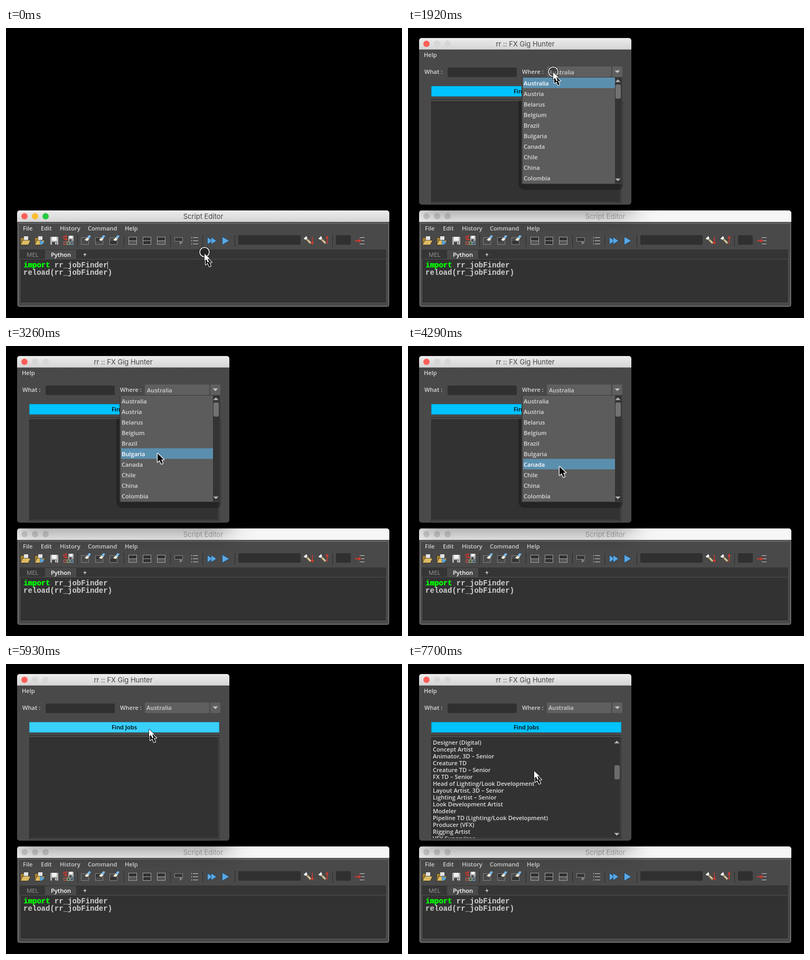
Animation, 750 px wide and 550 px high, one loop 8000 ms. Source, as an HTML page with a canvas:

```html
<!DOCTYPE html>
<html lang="en">
<head>
<meta charset="utf-8">
<title>Script editor demo</title>
<style>
html, body { margin: 0; height: 100%; overflow: hidden; background: #000; }
canvas { display: block; }
</style>
</head>
<body>
<canvas id="stage" width="750" height="550"></canvas>
<script>
const c = document.getElementById('stage').getContext('2d');
const LOOP = 8000, TICKS = 54;
const UI = '"Open Sans", "Noto Sans", sans-serif';
const LABEL = '600 11.1px ' + UI;
const TITLE = '13px Inter, sans-serif';
const MONO = 'bold 14px "Liberation Mono", monospace';

const countries = ['Australia', 'Austria', 'Belarus', 'Belgium', 'Brazil',
  'Bulgaria', 'Canada', 'Chile', 'China', 'Colombia'];
const jobs = ['3D Generalist', 'Animator', 'Art Director', 'Asset Artist', 'Compositor',
  'Compositor – Senior', 'CG Supervisor', 'Data Operator', 'Editor', 'Environment Artist',
  'FX Artist', 'Groom Artist', 'Lighting TD', 'Matte Painter', 'Motion Designer',
  'Previs Artist', 'Production Manager', 'Render Wrangler', 'Roto Artist', 'Texture Artist',
  'Designer (Digital)', 'Concept Artist', 'Animator, 3D – Senior', 'Creature TD',
  'Creature TD – Senior', 'FX TD – Senior', 'Head of Lighting/Look Development',
  'Layout Artist, 3D – Senior', 'Lighting Artist – Senior', 'Look Development Artist',
  'Modeler', 'Pipeline TD (Lighting/Look Development)', 'Producer (VFX)',
  'Rigging Artist', 'VFX Supervisor'];

// pointer path: tick, x, y
const path = [[0, 375, 427], [1, 375, 427], [3, 391, 403], [4, 391, 403], [5, 385, 385],
  [6, 278, 190], [7, 213, 88], [8, 238, 71], [9, 274, 83], [15, 274, 83],
  [17, 278, 106], [22, 286, 203], [26, 288, 259], [29, 286, 228], [30, 284, 195],
  [33, 275, 100], [38, 275, 100], [40, 270, 123], [44, 270, 123], [49, 238, 202], [54, 238, 202]];

function pointerAt(k) {
  const i = Math.max(1, path.findIndex(p => p[0] >= k));
  const [k0, x0, y0] = path[i - 1], [k1, x1, y1] = path[i];
  const u = (k - k0) / (k1 - k0);
  return [x0 + (x1 - x0) * u, y0 + (y1 - y0) * u];
}

function rect(x, y, w, h, fill, r = 0) {
  c.fillStyle = fill;
  c.beginPath();
  c.roundRect(x, y, w, h, r);
  c.fill();
}
function box(x, y, w, h, stroke) {
  c.strokeStyle = stroke;
  c.lineWidth = 1;
  c.strokeRect(x + .5, y + .5, w - 1, h - 1);
}
function poly(pts, fill, stroke, width = 1) {
  c.beginPath();
  for (let i = 0; i < pts.length; i += 2) c.lineTo(pts[i], pts[i + 1]);
  c.closePath();
  if (stroke) { c.strokeStyle = stroke; c.lineWidth = width; c.stroke(); }
  if (fill) { c.fillStyle = fill; c.fill(); }
}
function circle(x, y, r, fill, stroke, width = 1) {
  c.beginPath();
  c.arc(x, y, r, 0, 7);
  if (fill) { c.fillStyle = fill; c.fill(); }
  if (stroke) { c.strokeStyle = stroke; c.lineWidth = width; c.stroke(); }
}
function text(s, x, mid, fill = '#d8d8d8', font = LABEL, align = 'left') {
  c.font = font;
  c.textAlign = align;
  c.fillStyle = fill;
  c.fillText(s, x, mid + 4);
}
function arrow(x, y, dir, fill = '#b8b8b8') {
  poly([x - 5, y - 2.5 * dir, x + 5, y - 2.5 * dir, x, y + 2.5 * dir], fill);
}

function windowFrame(x, y, w, h, title, active, lights) {
  rect(x, y, w, h, '#494949', 5);
  const g = c.createLinearGradient(0, y, 0, y + 21);
  g.addColorStop(0, active ? '#ececec' : '#f6f6f6');
  g.addColorStop(1, active ? '#d6d6d6' : '#f6f6f6');
  rect(x, y, w, 21, g, [5, 5, 0, 0]);
  rect(x, y + 21, w, 1, active ? '#b4b4b4' : '#d2d2d2');
  lights.forEach((col, i) => circle(x + 14 + 20 * i, y + 11, 6, col));
  text(title, x + w / 2, y + 11.5, active ? '#444' : '#acacac', TITLE, 'center');
}

function folder(x) {
  poly([x, 411, x, 398, x + 5, 398, x + 7, 400, x + 13, 400, x + 13, 411], '#a8822f', '#3a3020');
  rect(x + 6, 395, 8, 9, '#e4e4e4');
  poly([x, 411, x + 4, 403, x + 18, 403, x + 14, 411], '#dcbc62', '#3a3020', 1.5);
}
function floppy(x, y, s) {
  rect(x, y, s, s, '#b4b4b4', 1);
  rect(x + s * .2, y, s * .6, s * .5, '#f4f4f4');
  rect(x + s * .2, y + s * .65, s * .6, s * .35, '#444');
  rect(x + s * .6, y + s * .7, s * .15, s * .25, '#ddd');
}
function eraser(x, full) {
  c.setLineDash([1, 1]);
  box(x, 397, 15, 14, '#bbb');
  c.setLineDash([]);
  if (full) rect(x + 1, full < 2 ? 398 : 404, 13, 6, '#333');
  poly([x + 7, 402, x + 11, 398, x + 16, 399, x + 12, 404], '#f6efdc');
  poly([x + 11, 398, x + 15, 393, x + 19, 394, x + 16, 399], '#7cbcec');
}
function pane(x, split) {
  rect(x, 396, 16, 15, '#303030');
  if (split < 2) rect(x, 404, 16, 7, '#555');
  box(x, 396, 16, 15, '#a2a2a2');
  if (split) c.setLineDash([2, 1]);
  box(x, 403, 16, 1, '#aaa');
  c.setLineDash([]);
}
function play(x, w, h) {
  poly([x, 403.5 - h, x + w, 403.5, x, 403.5 + h], '#5aa9e6', '#1d4a70', 1.5);
}
function torch(x, dir) {
  c.save();
  c.translate(x + 6, 402);
  c.rotate(.8);
  rect(-2, -2, 11, 4, '#a8966a', 1);
  rect(1, -1, 7, 1.5, '#efe4c0');
  poly([-7, -4, -2, -2, -2, 2, -7, 4], '#f4f4f4', '#222');
  c.restore();
  rect(x + 14.5, 396, 1.5, 13, '#d8372c');
  const tip = dir > 0 ? 411 : 394;
  poly([x + 12, tip - 5 * dir, x + 18.5, tip - 5 * dir, x + 15.2, tip], '#d8372c');
}

function toolbar() {
  for (const x of [135, 223, 311, 372, 433, 618]) rect(x, 393, 1, 22, '#2c2c2c');
  folder(28);
  folder(55);
  poly([65, 402, 73, 407, 65, 412], '#58a6e4', '#234');
  floppy(84, 396, 15);
  floppy(118, 394, 10);
  poly([109, 396, 115, 394, 113, 398, 116, 402, 111, 401], null, '#d8372c', 1.5);
  ['#e0564c', '#9ccf8e', '#8ab8dc'].forEach((col, i) => box(109 + 6.5 * i, 405, 5.5, 6, col));
  eraser(142, 0);
  eraser(169, 1);
  eraser(196, 2);
  pane(232, 1);
  pane(259, 2);
  pane(286, 0);
  rect(319, 397, 16, 8, '#333');
  box(319, 397, 16, 8, '#888');
  poly([329, 404, 335, 407, 329, 411], '#858585');
  for (const y of [397, 403, 409]) {
    rect(354, y, 10, 1, '#ccc');
    rect(351, y - 1, 1, 3, '#aaa');
  }
  play(382, 9, 6);
  play(389, 9, 6);
  play(410, 12, 7);
  rect(440, 393, 118, 18, '#303030', 2);
  rect(625, 393, 28, 18, '#303030', 2);
  torch(565, 1);
  torch(593, -1);
  for (const y of [397, 403, 409]) rect(670, y, 9, 1, '#ccc');
  rect(661, 402.5, 9, 2, '#d8372c');
  poly([668, 400, 673, 403.5, 668, 407], '#d8372c');
}

function editor(active) {
  windowFrame(21, 346, 705, 183, 'Script Editor', active,
    active ? ['#ff5f57', '#ffbd2e', '#28c940'] : Array(3).fill('#d4d4d4'));
  box(23, 370, 702, 158, '#7c7c7c');
  [['File', 32], ['Edit', 66], ['History', 102], ['Command', 155], ['Help', 225]]
    .forEach(([s, x]) => text(s, x, 380));
  toolbar();
  rect(26, 420, 694, 18, '#353535');
  rect(74, 421, 59, 18, '#494949');
  text('MEL', 39, 430, '#999', '11.4px ' + UI);
  text('Python', 85, 430, '#fff');
  text('+', 146, 430, '#eee', '600 12px ' + UI);
  rect(28, 438, 691, 82, '#323232');
  box(28, 438, 691, 82, '#282828');
  rect(28, 438, 691, 1, '#4e4e4e');
  text('import', 33, 450, '#0f0', MONO);
  text('import', 33.5, 450, '#0f0', MONO);
  text('rr_jobFinder', 91.8, 450, '#d0d0d0', MONO);
  text('reload(rr_jobFinder)', 33, 464, '#d0d0d0', MONO);
  if (active) rect(192, 443, 1, 14, '#ddd');
}

function jobList(scroll) {
  c.save();
  c.beginPath();
  c.rect(45, 141, 357, 189);
  c.clip();
  jobs.forEach((s, i) => text(s, 47, 149 + 13 * (i - scroll), '#e0e0e0'));
  c.restore();
  arrow(395.5, 148, -1);
  arrow(395.5, 323, 1);
  rect(391, 154 + 1.9 * scroll, 10, 27, '#6c6c6c', 3);
}

function menu(row) {
  rect(209, 138, 198, 169, 'rgba(0,0,0,.28)', [0, 0, 8, 12]);
  rect(215, 93, 191, 203, '#3e3e3e');
  rect(217, 94, 175, 201, '#5c5c5c');
  rect(392, 94, 12, 200, '#343434');
  rect(218, 94 + 20 * row, 174, 20, '#5b8fae');
  countries.forEach((s, i) => text(s, 219, 105 + 20 * i, i === row ? '#fff' : '#d8d8d8'));
  arrow(397.5, 100, -1);
  arrow(397.5, 288, 1);
  rect(393, 107, 10, 27, '#727272', 3);
}

function finder(k, y) {
  // drop shadow falling on the window below
  c.save();
  c.beginPath();
  c.roundRect(21, 346, 705, 183, 5);
  c.clip();
  c.shadowColor = 'rgba(0,0,0,.45)';
  c.shadowBlur = 45;
  c.shadowOffsetY = 16;
  rect(21, 19, 402, 316, '#000', 5);
  c.restore();

  const open = k >= 12 && k < 38;
  windowFrame(21, 19, 402, 316, 'rr :: FX Gig Hunter', true, ['#ff5f57', '#d6d6d6', '#d6d6d6']);
  text('Help', 30, 51);
  text('What :', 31, 83);
  rect(75, 75, 131, 18, '#303030', 2);
  text('Where :', 216, 83);
  rect(263, 73, 122, 20, '#5f5f5f', 2);
  rect(387, 73, 19, 20, '#5f5f5f', 2);
  arrow(396.5, 83, 1, '#c4c4c4');
  text('Australia', open ? 267 : 266, open ? 84 : 83, '#d0d0d0');
  const hover = !open && k >= 40 && y < 130;
  rect(44, 110, 360, 20, hover ? '#38d0ff' : '#00c3ff');
  box(44, 110, 360, 20, 'rgba(0,60,90,.25)');
  text('Find Jobs', 224, 120, '#000', LABEL, 'center');
  rect(44, 135, 360, 1, '#2a2a2a');
  rect(44, 139, 360, 193, '#323232');
  box(44, 139, 360, 193, '#292929');
  rect(402, 140, 1, 191, '#505050');
  rect(45, 330, 358, 1, '#505050');
  if (k >= 43) jobList([0, 6, 13, 20][Math.min(3, Math.max(0, k - 49))]);
  if (open) menu(Math.min(9, Math.max(0, Math.floor((y - 94) / 20))));
}

function arrowCursor(x, y, fill, edge, width, size = 1) {
  c.save();
  c.translate(x + 1, y + 1);
  c.scale(size, size);
  c.lineJoin = 'round';
  poly([0, 0, 0, 16, 4, 12.5, 7, 19.5, 10, 18.5, 7, 11.5, 12, 11.5], fill, edge, width);
  c.restore();
}
function pointer(k, x, y) {
  const ring = k < 1 || (k >= 11 && k < 14) || (k >= 37 && k < 39) || (k >= 42 && k < 44);
  if (ring) {
    const cy = k < 1 ? y - 2 : y;
    circle(x + 1, cy, 9, 'rgba(0,0,0,.3)', '#222', 3.5);
    circle(x + 1, cy, 9, null, '#fff', 1.5);
  }
  if (k >= 16 && k < 38) return arrowCursor(x, y, '#000', '#fff', 2.5);
  // a pale pointer overlaps the system one
  arrowCursor(x + 2, y + 5, '#000', '#fff', 2);
  arrowCursor(x, y, '#fff', '#111', 1.5, .85);
}

function draw(t) {
  const k = Math.floor(t * TICKS / LOOP + .06);
  const [x, y] = pointerAt(k);
  const launched = k >= 2;
  c.fillStyle = '#000';
  c.fillRect(0, 0, 750, 550);
  editor(!launched);
  if (launched) finder(k, y);
  pointer(k, x, y);
}

const start = performance.now();
function frame() {
  draw((performance.now() - start) % LOOP);
  requestAnimationFrame(frame);
}
frame();
</script>
</body>
</html>
```
